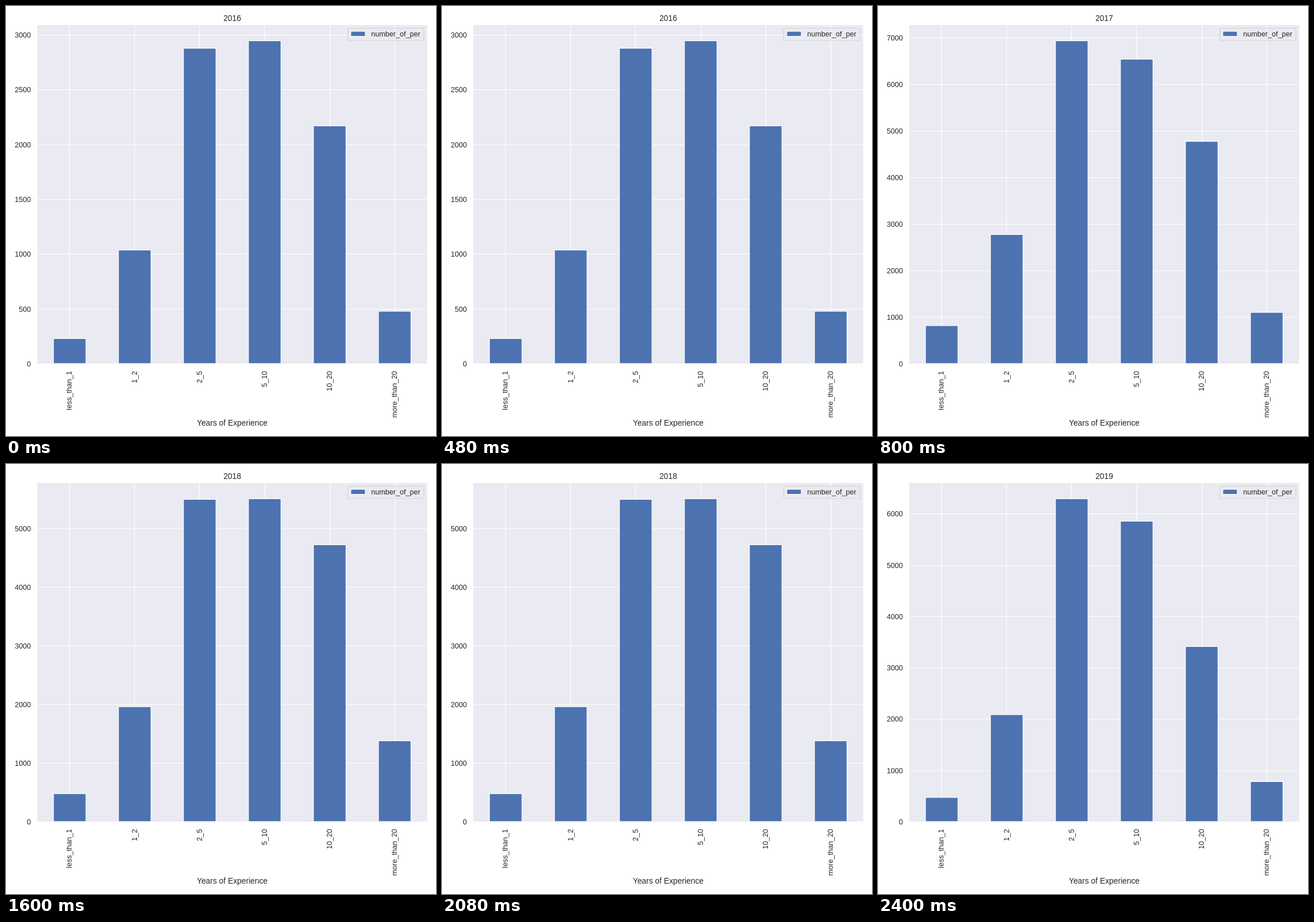
Recreate the animation shown at these times as an HTML page with a canvas. Size 748 by 748 pixels, loop 3200 ms.

```html
<!DOCTYPE html>
<html lang="en">
<head>
<meta charset="utf-8">
<title>Years of Experience</title>
<style>
  html, body { margin: 0; width: 100%; height: 100%; overflow: hidden; background: #fff; }
  canvas { display: block; }
</style>
</head>
<body>
<canvas id="chart" width="748" height="748"></canvas>
<script>
const ctx = document.getElementById('chart').getContext('2d');
const HOLD = 800;
const plot = { left: 54.3, right: 732.7, top: 33, bottom: 622 };
const slot = (plot.right - plot.left) / 6;
const categories = ['less_than_1', '1_2', '2_5', '5_10', '10_20', 'more_than_20'];

// step: value between grid lines, gap: their distance in pixels, tops: upper edge of each bar
const years = [
  { year: 2016, step: 500, gap: 95.3, tops: [578.5, 424.5, 73.5, 60.5, 208.5, 531] },
  { year: 2017, step: 1000, gap: 80.95, tops: [556, 397.5, 60.5, 92.5, 235.5, 533] },
  { year: 2018, step: 1000, gap: 101.9, tops: [573.5, 422.2, 61.5, 60.5, 140.5, 481.5] },
  { year: 2019, step: 1000, gap: 89.25, tops: [580, 436, 60.5, 99.5, 317.5, 552.5] }
];

const center = i => plot.left + slot * (i + 0.5);

function text(str, x, y, size, align, turn = 0) {
  ctx.save();
  ctx.translate(x, y);
  ctx.rotate(turn);
  ctx.font = size + 'px "Liberation Sans", Arial, sans-serif';
  ctx.textAlign = align;
  ctx.fillStyle = '#262626';
  ctx.fillText(str, 0, 0);
  ctx.restore();
}

function line(x1, y1, x2, y2) {
  ctx.beginPath();
  ctx.moveTo(x1, y1);
  ctx.lineTo(x2, y2);
  ctx.stroke();
}

function bar(x, y, w, h) {
  ctx.fillStyle = '#4c72b0';
  ctx.fillRect(x, y, w, h);
  ctx.strokeRect(x, y, w, h);
}

function legend() {
  ctx.save();
  ctx.globalAlpha = 0.8;
  ctx.beginPath();
  ctx.roundRect(594.5, 38.5, 132.5, 21.5, 2.5);
  ctx.fillStyle = '#eaeaf2';
  ctx.fill();
  ctx.strokeStyle = '#ccc';
  ctx.stroke();
  ctx.restore();
  bar(599.8, 44, 25.2, 8.8);
  text('number_of_per', 635.3, 52.7, 12.6, 'left');
}

function draw({ year, step, gap, tops }) {
  const { left, right, top, bottom } = plot;
  ctx.fillStyle = '#fff';
  ctx.fillRect(0, 0, 748, 748);
  ctx.fillStyle = '#eaeaf2';
  ctx.fillRect(left, top, right - left, bottom - top);

  ctx.strokeStyle = '#fff';
  ctx.lineWidth = 1.2;
  for (let n = 0; bottom - n * gap > top; n++) {
    const y = Math.round(bottom - n * gap - 0.1) + 0.5;
    line(left, y, right, y);
    text(n * step, 43.2, y + 4.4, 12.6, 'right');
  }
  categories.forEach((name, i) => {
    const x = Math.floor(center(i)) + 0.5;
    line(x, top, x, bottom);
    text(name, center(i) + 3.6, 635, 12.6, 'right', -Math.PI / 2);
  });
  tops.forEach((y, i) => bar(center(i) - slot / 4, y, slot / 2, bottom - y));

  legend();
  text(year, 393.5, 25.5, 13.8, 'center');
  text('Years of Experience', 393.5, 729.8, 13.8, 'center');
}

function tick() {
  draw(years[Math.floor(performance.now() / HOLD) % years.length]);
  requestAnimationFrame(tick);
}
tick();
</script>
</body>
</html>
```
